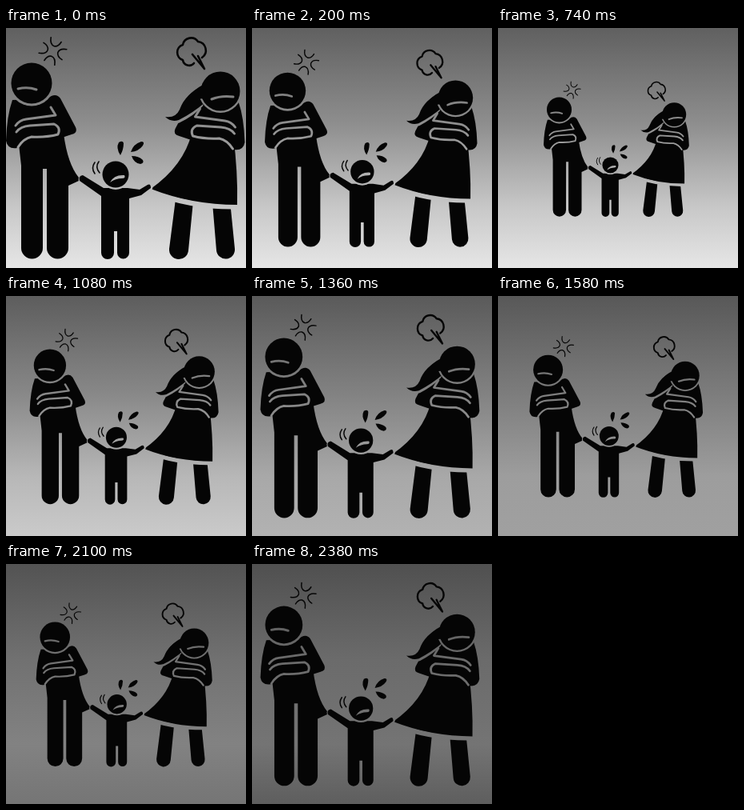
Recreate the animation shown at these times as an HTML page. Size 300 px wide and 300 px high, loop 2400 ms.

```html
<!DOCTYPE html>
<html lang="en">
<head>
<meta charset="utf-8">
<style>
  html, body { margin: 0; height: 100%; overflow: hidden; }
  svg { display: block; width: 100vw; height: 100vh; }
  #family { fill: #fff; stroke-linecap: round; stroke-linejoin: round; }
  .gap { fill: none; stroke: #000; stroke-width: 3; }
  .cut { fill: #000; }
  .line { fill: none; stroke: #fff; stroke-width: 1.6; }
</style>
</head>
<body>
<svg viewBox="0 0 300 300">
  <defs>
    <linearGradient id="wall" x2="0" y2="1">
      <stop/><stop offset=".4"/><stop offset=".75"/><stop offset="1"/>
    </linearGradient>
    <g id="torso">
      <path d="M8 90Q1 110 0 141Q2 152 14 150L70 137L82 133Q90 131 87 124L68 88Q62 80 52 88Z"/>
      <path class="gap" d="M12 122Q17 115 25 114L62 109L56 99M13 130Q18 123 30 122L60 120Q69 124 65 133Q50 137 32 136Q22 138 15 149"/>
    </g>
    <mask id="shape" maskUnits="userSpaceOnUse" x="0" y="0" width="300" height="300">
      <g id="family">
        <!-- father -->
        <path d="M16 145L19 172V275A13.500 13.500 0 0 0 46 275V176H51V275A13.500 13.500 0 0 0 78 275V197L91 191V187Q77 170 72 132Z"/>
        <use href="#torso"/>
        <circle class="cut" cx="32" cy="69" r="28.500"/>
        <circle cx="32" cy="69" r="25.500"/>
        <path class="gap" d="M15 76Q27 73 38 77"/>
        <g id="anger" transform="translate(58.5 29) rotate(16)"></g>

        <!-- mother -->
        <path d="M213 206H235L228 278A12 12 0 0 1 204 276ZM257 206H279L286 276A11.500 11.500 0 0 1 263 278Z"/>
        <path class="gap" d="M183 205Q232 224 288 223" style="stroke-width:7"/>
        <path d="M232 132Q222 172 181 201Q232 221 289 221Q290 180 284 134Z"/>
        <use href="#torso" transform="translate(298.5 2) scale(-1 1)"/>
        <path class="gap" d="M199 112Q206 119 216 116Q234 107 244 96" style="stroke-width:5"/>
        <path d="M248 71Q224 82 217 102Q212 113 199 111Q206 118 216 115Q234 106 250 92Z"/>
        <circle class="cut" cx="268" cy="79" r="27"/>
        <path d="M248 70Q232 78 224 91L247 88Z"/>
        <circle cx="268" cy="79" r="24.500"/>
        <path class="gap" d="M257 89Q269 84 284 86"/>
        <path class="line" style="stroke-width:2.6" d="M235 44A8 8 0 0 1 221 40A10 10 0 0 1 221 21A10.500 10.500 0 0 1 240 17A11 11 0 0 1 245 37M233 33L248 51L240 35"/>

        <!-- child -->
        <path class="gap" style="stroke-width:11" d="M120 203L96 189M156 206L178 199"/>
        <path d="M122 200L96 184Q90 185 92 191L119 210V281A8 8 0 0 0 135 281V254H139V281A7.500 7.500 0 0 0 154 281V213L169 209L181 200Q181 194 177 196L167 202L152 200Z"/>
        <circle class="cut" cx="137" cy="183" r="19"/>
        <circle cx="137" cy="183" r="16.500"/>
        <path class="cut" d="M130 193Q135 183 148 184Q150 188 145 188Q137 188 130 193Z"/>
        <path class="line" d="M116 167Q111 174 117 181M111 168Q106 175 111 182"/>
        <path d="M143 159Q137 150 141 143Q146 140 147 144Q147 152 143 159ZM156 155Q159 145 169 142Q174 142 171 147Q166 154 156 155ZM157 160Q166 160 171 165Q173 169 168 170Q160 169 157 160Z"/>
      </g>
    </mask>
  </defs>
  <rect width="300" height="300" fill="url(#wall)"/>
  <rect width="300" height="300" fill="#050505" mask="url(#shape)"/>
</svg>
<script>
const LOOP = 2400;
// time, zoom, horizontal centre
const KEYS = [
  [0, 1, 151], [580, .588, 149], [680, .588, 149], [1300, .93, 149],
  [1800, .588, 149], [LOOP, .93, 149]
];
const DAY = [96, 142, 200, 230];
const DUSK = [80, 107, 115, 92];

const family = document.getElementById('family');
const stops = document.querySelectorAll('#wall stop');
const mix = (a, b, k) => a + (b - a) * k;
const swing = x => (1 - Math.cos(Math.PI * x)) / 2;
const rush = x => x ** 1.2;

document.getElementById('anger').innerHTML = [0, 90, 180, 270].map(a =>
  `<path class="line" transform="rotate(${a})" d="M-7 -16Q-6 -7 0 -6.5Q5 -7 7 -14"/>`).join('');

function draw(t) {
  const i = KEYS.findIndex(key => key[0] > t);
  const [t0, zoom0, x0] = KEYS[i - 1];
  const [t1, zoom1, x1] = KEYS[i];
  const p = (t - t0) / (t1 - t0);
  const zoom = mix(zoom0, zoom1, (zoom1 < zoom0 ? swing : rush)(p));
  family.setAttribute('transform',
    `translate(${mix(x0, x1, p)} 153.5) scale(${zoom}) translate(-151 -153.5)`);

  const dusk = Math.max(0, (t - 740) / (LOOP - 740));
  stops.forEach((stop, n) => {
    const v = mix(DAY[n], DUSK[n], dusk);
    stop.setAttribute('stop-color', `rgb(${v},${v},${v})`);
  });
}

const start = performance.now();
function tick() {
  draw((performance.now() - start) % LOOP);
  requestAnimationFrame(tick);
}
tick();
</script>
</body>
</html>
```
